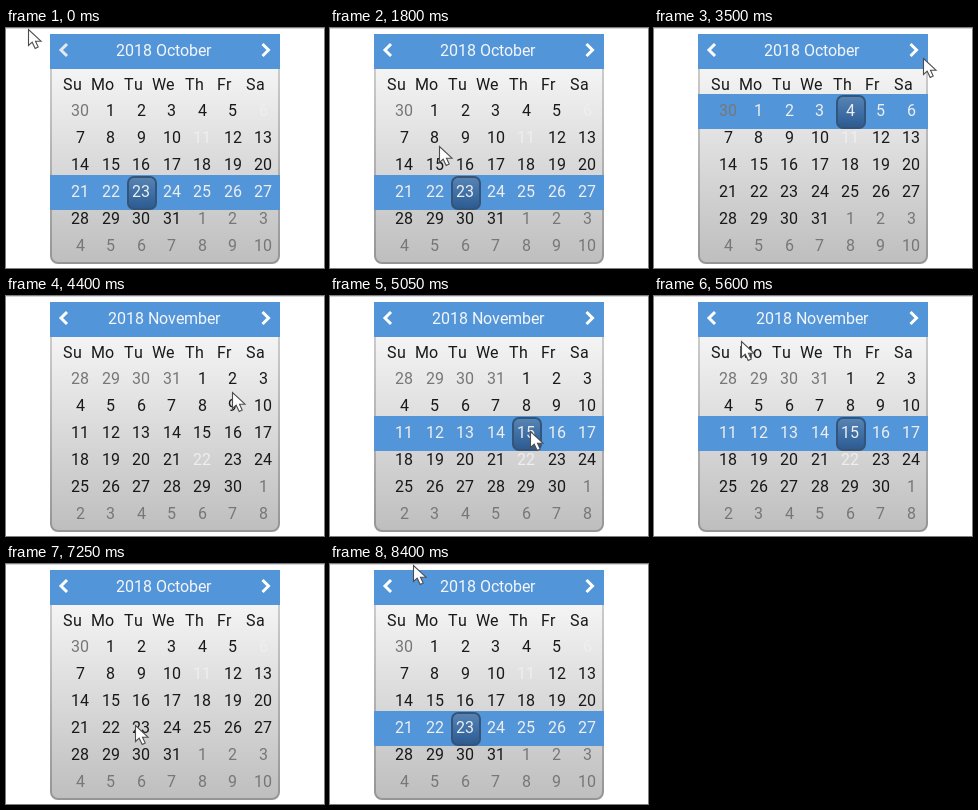
Recreate the animation shown at these times as an HTML page with a canvas. Size 318 px wide and 240 px high, loop 8750 ms.

```html
<!DOCTYPE html>
<html lang="en">
<head>
<meta charset="utf-8">
<title>Calendar</title>
<style>
  html, body { margin: 0; width: 100%; height: 100%; overflow: hidden; background: #fff; }
  canvas { display: block; }
</style>
</head>
<body>
<canvas id="stage" width="318" height="240"></canvas>
<script>
const ctx = document.getElementById('stage').getContext('2d');
const LOOP = 8750, STEP = 50;
const BLUE = '#5395d9', INK = '#191919', FADED = '#777', PALE = '#eee';
const LEFT = 44, WIDTH = 230, COLUMN = 30.5, ROW = 27;
const OCTOBER = { title: '2018 October', month: 9, holidays: [6, 11] };
const NOVEMBER = { title: '2018 November', month: 10, holidays: [22] };

// What each click shows; without a day nothing is selected.
const clicks = [
  { t: 0, page: OCTOBER, day: 23 },
  { t: 1900, page: OCTOBER, day: 8 },
  { t: 3000, page: OCTOBER, day: 4 },
  { t: 3900, page: NOVEMBER },
  { t: 5050, page: NOVEMBER, day: 15 },
  { t: 6300, page: OCTOBER },
  { t: 7500, page: OCTOBER, day: 23 }
];

const home = { x: 23, y: 1 };
const moves = [
  { from: 400, to: 800, x: 20, y: 78, bend: -0.11 },
  { from: 1100, to: 1200, x: 58, y: 100 },
  { from: 1350, to: 1500, x: 110, y: 118 },
  { from: 2250, to: 2850, x: 208, y: 76 },
  { from: 3200, to: 3600, x: 275, y: 26 },
  { from: 3600, to: 3700, x: 262, y: 26, bend: 0.8 },
  { from: 4100, to: 4800, x: 201, y: 135, bend: -0.03 },
  { from: 5150, to: 5900, x: 68, y: 17, bend: -0.07 },
  { from: 6550, to: 7250, x: 130, y: 161 },
  { from: 8000, to: 8400, x: 84, y: 1 }
];

function pointerAt(t) {
  const i = moves.findLastIndex(move => t >= move.from);
  if (i < 0) return home;
  const { from, to, x, y, bend = 0 } = moves[i];
  const start = moves[i - 1] ?? home;
  const u = Math.sin(Math.PI / 2 * Math.min(1, (t - from) / (to - from)));
  const arc = 4 * u * (1 - u) * bend;
  const dx = x - start.x, dy = y - start.y;
  return {
    x: Math.round(start.x + dx * u - dy * arc),
    y: Math.round(start.y + dy * u + dx * arc)
  };
}

function verticalGradient(top, bottom, ...colors) {
  const gradient = ctx.createLinearGradient(0, top, 0, bottom);
  colors.forEach((color, i) => gradient.addColorStop(i / (colors.length - 1), color));
  return gradient;
}

function roundBox(x, y, w, h, radius, fill, stroke) {
  ctx.beginPath();
  ctx.roundRect(x, y, w, h, radius);
  ctx.fillStyle = fill;
  ctx.fill();
  ctx.strokeStyle = stroke;
  ctx.lineWidth = 2;
  ctx.stroke();
}

// Centres a line of text with every letter on a whole pixel.
function text(value, center, baseline, color) {
  let x = Math.floor(center - ctx.measureText(value).width / 2);
  ctx.fillStyle = color;
  for (const letter of value) {
    ctx.fillText(letter, x, baseline);
    x += Math.round(ctx.measureText(letter).width);
  }
}

function chevron(x, direction, color) {
  ctx.beginPath();
  ctx.moveTo(x - 3 * direction, 16);
  ctx.lineTo(x + 3 * direction, 22);
  ctx.lineTo(x - 3 * direction, 28);
  ctx.strokeStyle = color;
  ctx.lineWidth = 3;
  ctx.stroke();
}

function drawCalendar(t) {
  const { page, day: selected } = clicks.findLast(click => t >= click.t);
  const lead = new Date(2018, page.month, 1).getDay();
  const cell = selected ? lead + selected - 1 : -1;
  const selectedRow = Math.floor(cell / 7);

  roundBox(LEFT + 1, 40, WIDTH - 2, 195, [0, 0, 7, 7],
    verticalGradient(41, 235, '#f4f4f4', '#bebebe'),
    verticalGradient(41, 235, '#cbcbcb', '#959595'));
  ctx.fillStyle = BLUE;
  ctx.fillRect(LEFT, 6, WIDTH, 35);
  if (selected) {
    const top = 66 + ROW * selectedRow;
    ctx.fillRect(LEFT, top, WIDTH, 35);
    roundBox(Math.floor(61 + COLUMN * (cell % 7)), top + 2, 28, 32, 6,
      verticalGradient(top, top + 35, '#5c87b5', '#3f70a6', '#2c598e'), '#34547a');
  }

  const dimmed = t < 1800 || (t >= 6100 && t < 6300);
  chevron(58, -1, dimmed ? '#e4e9ef' : '#fff');
  chevron(259.5, 1, '#fff');
  text(page.title, 159, 28, '#f3f6fa');
  ['Su', 'Mo', 'Tu', 'We', 'Th', 'Fr', 'Sa'].forEach((name, i) =>
    text(name, 66.5 + COLUMN * i, 62, INK));

  for (let i = 0; i < 42; i++) {
    const date = new Date(2018, page.month, 1 - lead + i);
    const day = date.getDate(), row = Math.floor(i / 7);
    const light = selected && row === selectedRow || page.holidays.includes(day);
    const color = date.getMonth() !== page.month ? FADED : light ? PALE : INK;
    text(day.toString(), 74.6 + COLUMN * (i % 7), 88 + ROW * row, color);
  }
}

const arrow = new Path2D('M0 .5v16l3.7-3.3 3 6.3 3-1.4-2.7-5.9h5.5z');

function drawPointer({ x, y }) {
  ctx.save();
  ctx.translate(x - 0.5, y);
  ctx.fillStyle = '#fff';
  ctx.fill(arrow);
  ctx.strokeStyle = '#4c4c50';
  ctx.lineWidth = 1.1;
  ctx.stroke(arrow);
  ctx.restore();
}

function draw(now) {
  const t = Math.floor(now % LOOP / STEP) * STEP;
  ctx.fillStyle = '#fff';
  ctx.fillRect(0, 0, 318, 240);
  ctx.fillStyle = '#d6d6d6';
  ctx.fillRect(0, 0, 318, 1);
  ctx.font = '16px Roboto, sans-serif';
  drawCalendar(t);
  drawPointer(pointerAt(t));
}

let start;
function frame(now) {
  start ??= now;
  draw(now - start);
  requestAnimationFrame(frame);
}
requestAnimationFrame(frame);
</script>
</body>
</html>
```
